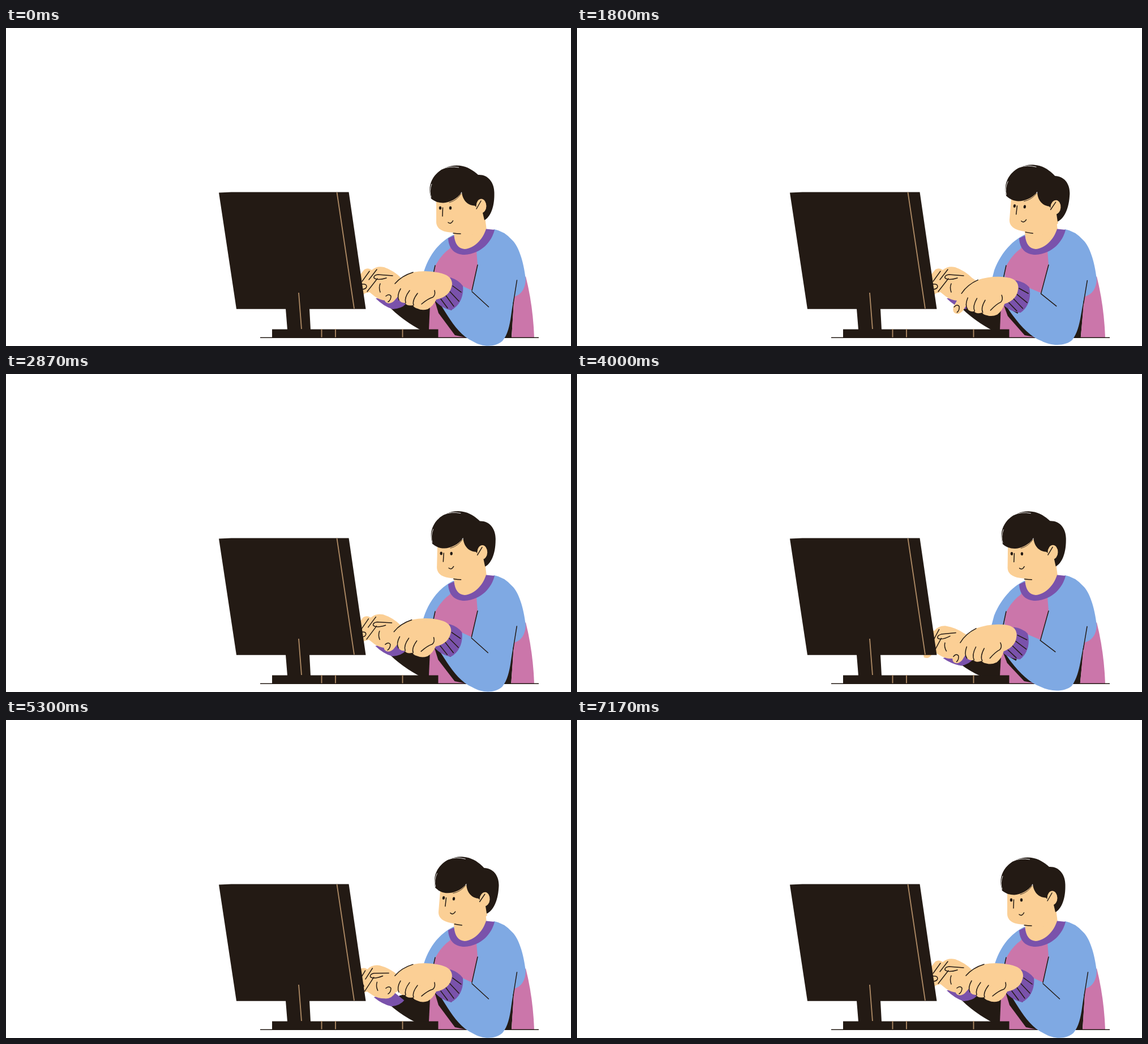
An HTML page that plays this animation: 998 px wide and 561 px high, repeating every 7.21 s.

```html
<!DOCTYPE html>
<html lang="en">
<head>
<meta charset="utf-8">
<title>Typing at a computer</title>
<style>
  html, body { margin: 0; width: 100%; height: 100%; overflow: hidden; background: #fff; }
  svg { display: block; width: 100vw; height: 100vh; }
  .ink { fill: #231a14; }
  .skin { fill: #fbcf95; }
  .blue { fill: #7fa9e3; }
  .pink { fill: #cb76aa; }
  .violet { fill: #7a52ab; }
  .line { fill: none; stroke: #231a14; stroke-width: 1.5; stroke-linecap: round; }
  .thin { stroke-width: .8; }
  .trim { fill: none; stroke: #b08c66; stroke-width: 1.8; }
  .shine { fill: none; stroke: #fff; stroke-width: .9; }
</style>
</head>
<body>
<!-- In data-d, "a|b" is a coordinate with the arm raised (a) and lowered (b). -->
<svg viewBox="0 0 998 561">
  <g id="torso">
    <path class="pink" d="M784 384L832 390 850 546H747V500L752 470 754 430 764 394Z"/>
    <path class="ink" data-arm="front" data-d="M757|750 480|499L764|757 503|514 793|788 542 812 546H838L790 495Z"/>
    <path class="ink" data-arm="front" data-d="M898|895 472L893|886 546H870Z"/>
    <path class="pink" data-arm="front" data-d="M898|895 466L918 438Q931 490 933 546H893|886Z"/>
    <path class="blue" data-arm="front" data-d="M792 364C768 375 748 398 738|736 430|424L734|729 447|449 760|752 450 756 424Q767 401 784 389Z"/>
    <path class="line" d="M758 419L752 447"/>
  </g>

  <path class="ink" data-arm="back" data-d="M700|690 478|495L750 465|480 747 532H731|711Q700|695 515|525 678|676 493|511Z"/>
  <g id="backHand">
    <path class="violet" d="M653 477L690 472 706 487Q699 495 683 496 667 491 653 477Z"/>
    <path class="skin" d="M620 442L633 426Q640 422 646 427 655 419 668 422 685 428 698 441L708 448 704 466 692 472Q684 483 672 481 660 480 652 474L642 466 634 468Q628 475 620 470Z"/>
    <path class="line" d="M629 447L642 429M638 465L656 442M641 444L655 426M683 437L657 435Q649 436 650 441 656 446 672 441M661 451Q658 458 661 466M628 452Q637 451 637 456 636 461 629 461"/>
  </g>

  <g id="computer">
    <path class="ink" d="M376 290.5L398 289.5H605.5L635.5 495.7H407Z"/>
    <path class="ink" d="M494 495H536L538 532H497ZM470 531.5H763.5V547H470Z"/>
    <path class="trim" d="M584.5 290L615 495M517 467L522 531M557.5 531V546M582 531V546M700.5 531V546"/>
    <path class="ink" d="M449 545.5H941V547H449Z"/>
  </g>

  <path class="skin" d="M790 354L792 368 793 387Q808 397 826 388 845 376 849 357L845 325 800 330Z"/>
  <g id="head">
    <path class="skin" d="M760 295V340C759 355 772 361 793 361L825 365 846 342 842 290Z"/>
    <path class="ink" d="M751 301C740 271 764 242.500 796 242.500 814 242.500 826 252 834 259 851 258 863 272 862.500 292 863 317 855 334 845 339L842 326 828 313.500C814 313 806 302 805 289 798 302 782 308 773 308.500 763 309 756 305 751 301Z"/>
    <ellipse class="skin" cx="839.5" cy="314" rx="9" ry="12.500"/>
    <path class="line" d="M831 319L839 305M771.500 317L771 332M781 343Q786 347 789.500 340M790 362Q797 363 803 363"/>
    <path class="line thin" d="M783 308Q797 304 804 292"/>
    <path class="shine" d="M770 249Q783 243 800 246M751 299Q747 288 752 275"/>
    <ellipse class="ink eye" cx="767" cy="317.500" rx="2.200" ry="3"/>
    <ellipse class="ink eye" cx="785" cy="317.500" rx="2.200" ry="3"/>
  </g>

  <g id="frontArm">
    <path class="blue" data-arm="front" data-d="M831 393L833 418 823|816 463|473 806|789 455|462 787|768 498|511 767|752 487|501C782|770 510|526 798|795 541|546 825|815 553|551 843|835 564|560 865|860 563|559 877|872 552|549 893|886 533|528 891|888 500 898|895 474Q917 468 918 443C914 410 905 385 895 375Q880 358 862 355Z"/>
    <path class="line" data-arm="front" data-d="M833 418L823|816 463|473M823|815 465|473L852.500|840 492|489M902.500|900 445|446L896|893 486"/>
    <g id="frontHand">
      <path class="violet" d="M785 440Q800 445 807 455C809 472 802 490 786 498Q768 494 756 479 776 465 785 440Z"/>
      <path class="line" d="M789 455L804 466M784 465L800 482M777 472L791 491M768 478L780 494"/>
      <path class="skin" d="M688 449Q702 436 718 431 745 426 770 433 788 438 788 452 785 474 760 479 755 490 745 496 735 499 727 495 720 493 719 489 708 491 705 485 695 486 692 474L685 482Q676 489 670 483 667 479 670 472L677 463Q680 455 688 449Z"/>
      <path class="line" d="M687 451Q699 437 719 431M697 460Q690 472 694 480M713 463Q703 476 706 485M727 468Q717 481 720 489M757 463Q759 471 754 475 746 477 734 487M671 473Q677 468 680 473 680 480 675 483"/>
    </g>
  </g>

  <path class="violet" d="M781 371C782 391 794 400 810 400 840 398 858 377 863 356L848 354.500C842 374 826 389 810 390 799 389 793 381 791.500 366Z"/>
</svg>

<script>
const LOOP = 7210, CYCLE = 3600, LEAN_PEAK = 1560, TAP = 400, TAPS = 7;
const byId = id => document.getElementById(id);
const limbs = [...document.querySelectorAll('[data-d]')];
const eyes = document.querySelectorAll('.eye');
const sin2 = turns => Math.sin(turns * Math.PI) ** 2;

// A row of equal taps; returns how far the hand is lowered.
function tapping(t, start, lastSize = 1) {
  const n = (t - start) / TAP;
  if (n < 0 || n >= TAPS) return 0;
  return sin2(n) * (n >= TAPS - 1 ? lastSize : 1);
}

function setHand(id, k, dx, dy, angle, pivot) {
  byId(id).setAttribute('transform',
    `translate(${dx * k} ${dy * k}) rotate(${angle * k} ${pivot})`);
}

function draw(now) {
  const t = now % CYCLE;
  const pose = { front: 1.07 * tapping(t, 110), back: tapping(t, 200, 0.15) };

  for (const limb of limbs) {
    const k = pose[limb.dataset.arm];
    limb.setAttribute('d', limb.dataset.d.replace(/([\d.]+)\|([\d.]+)/g,
      (_, a, b) => +a + (b - a) * k));
  }
  setHand('frontHand', pose.front, -16, 14.5, -16, '770 460');
  setHand('backHand', pose.back, -10, 18, -10, '690 460');

  const lean = t < LEAN_PEAK
    ? sin2(t / LEAN_PEAK / 2)
    : sin2((CYCLE - t) / (CYCLE - LEAN_PEAK) / 2);
  byId('head').setAttribute('transform', `rotate(${4.7 * lean} 815 390)`);

  const blink = Math.max(0, 1 - Math.abs(t - 1010) / 130);
  eyes.forEach(eye => eye.setAttribute('ry', 3 - 2.6 * blink));
}

function frame() {
  draw(performance.now() % LOOP);
  requestAnimationFrame(frame);
}
frame();
</script>
</body>
</html>
```
